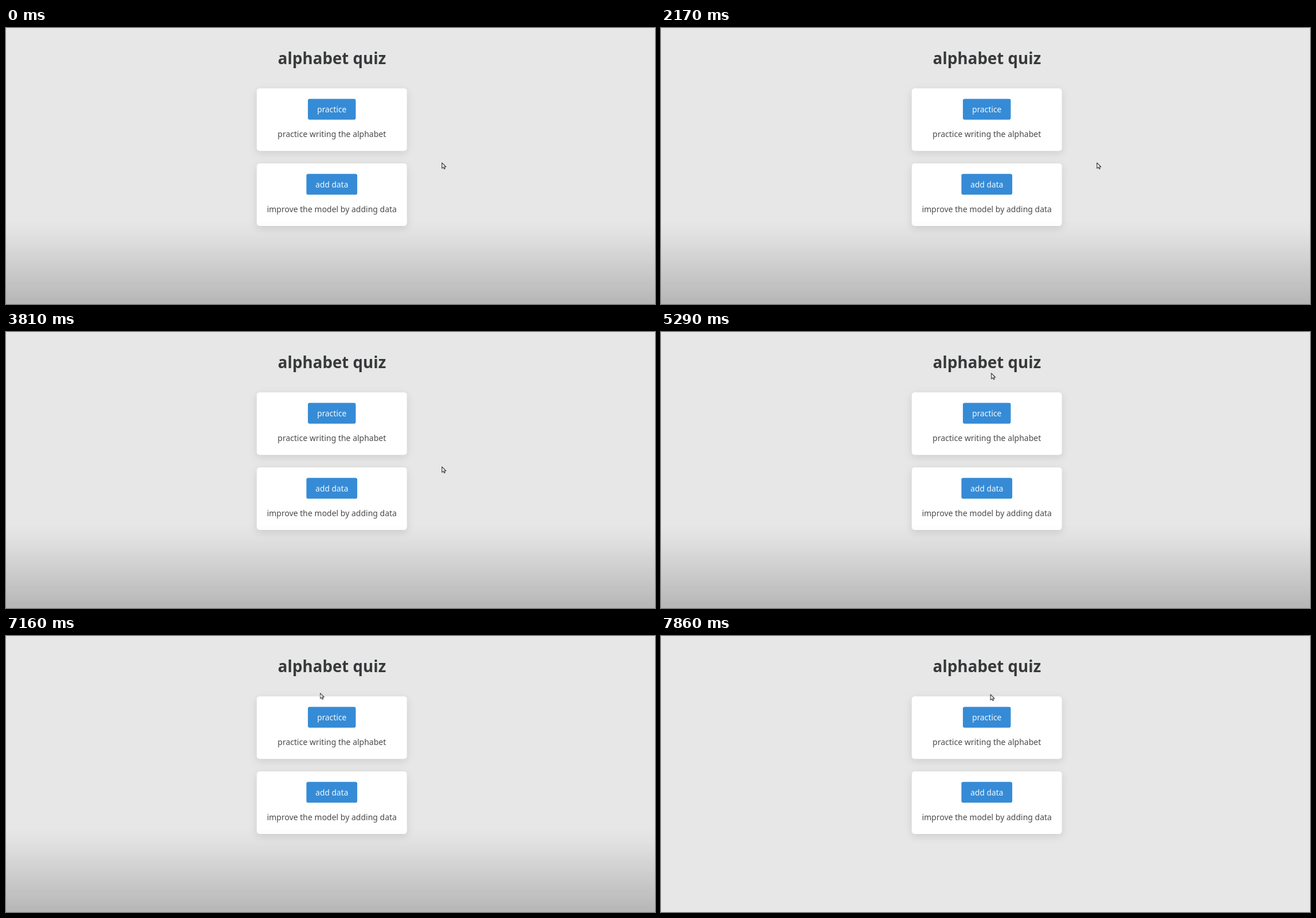
Animation, 1131 px wide and 481 px high, one loop 8 s. Source, as an HTML page:

```html
<!DOCTYPE html>
<html lang="en">
<head>
<meta charset="utf-8">
<title>alphabet quiz</title>
<style>
  html, body { margin: 0; width: 100%; height: 100%; overflow: hidden; background: #e7e7e7; }
  svg { display: block; width: 1131px; height: 481px; font-family: "Noto Sans", "Open Sans", sans-serif; }
  text { text-anchor: middle; }
  .title { font-size: 27.7px; font-weight: 700; fill: #37393b; }
  .label { font-size: 13.8px; fill: #f4f8fc; }
  .note { font-size: 14px; fill: #4a4a4a; }
  .card { fill: #fff; filter: drop-shadow(0 4px 7px rgba(0, 0, 0, .11)); }
  .button { fill: #368bd6; }
</style>
</head>
<body>
<svg viewBox="0 0 1131 481">
  <defs>
    <linearGradient id="fade" x1="0" y1="0" x2="0" y2="1">
      <stop offset="0" stop-opacity="0"/>
      <stop offset=".15" stop-opacity=".02"/>
      <stop offset="1" stop-opacity=".21"/>
    </linearGradient>
  </defs>
  <text class="title" x="568" y="63">alphabet quiz</text>
  <g id="cards"></g>
  <rect id="shade" y="334" width="1131" height="147" fill="url(#fade)"/>
  <path id="cursor" d="M.7 .8V10.6L3 8.6L4.6 11.8L6.2 11L4.8 8H7.8Z"
        fill="#f2f2f2" stroke="#3a3a3a" stroke-width="1.1" stroke-linejoin="round"/>
</svg>
<script>
  const LOOP = 8000;
  const HOLD = 'steps(1, end)';
  const MID = 567.8;

  const card = (top, label, buttonWidth, note) => `
    <g transform="translate(${MID} ${top})">
      <rect class="card" x="-130.8" width="261.6" height="109" rx="5"/>
      <rect class="button" x="${-buttonWidth / 2}" y="18.2" width="${buttonWidth}" height="36.4" rx="3"/>
      <text class="label" y="41.8">${label}</text>
      <text class="note" y="85.2">${note}</text>
    </g>`;

  document.getElementById('cards').innerHTML =
    card(105.2, 'practice', 83.4, 'practice writing the alphabet') +
    card(236, 'add data', 88.6, 'improve the model by adding data');

  // Each key: time in ms, style, and the easing towards the next key.
  function play(id, keys) {
    const frames = keys.map(([time, style, easing = 'ease-in-out']) =>
      ({ offset: time / LOOP, easing, ...style }));
    document.getElementById(id).animate(frames, { duration: LOOP, iterations: Infinity });
  }

  const at = (x, y) => ({ transform: `translate(${x}px, ${y}px)` });
  const dim = opacity => ({ opacity });

  play('cursor', [
    [0, at(759, 234), HOLD],
    [4600, at(540, 148), HOLD],
    [4860, at(544, 59), HOLD],
    [5060, at(558, 64)],
    [5290, at(575, 71)],
    [5570, at(573, 100)],
    [5980, at(576, 84), HOLD],
    [6210, at(580, 73), HOLD],
    [6930, at(574, 78)],
    [7160, at(546.5, 98.5)],
    [7700, at(576, 120)],
    [7860, at(573.5, 101), HOLD],
    [LOOP, at(573.5, 101)]
  ]);

  play('shade', [
    [0, dim(1), HOLD],
    [3170, dim(.26), HOLD],
    [3810, dim(1), HOLD],
    [7380, dim(1)],
    [7640, dim(0)],
    [LOOP, dim(0)]
  ]);
</script>
</body>
</html>
```
